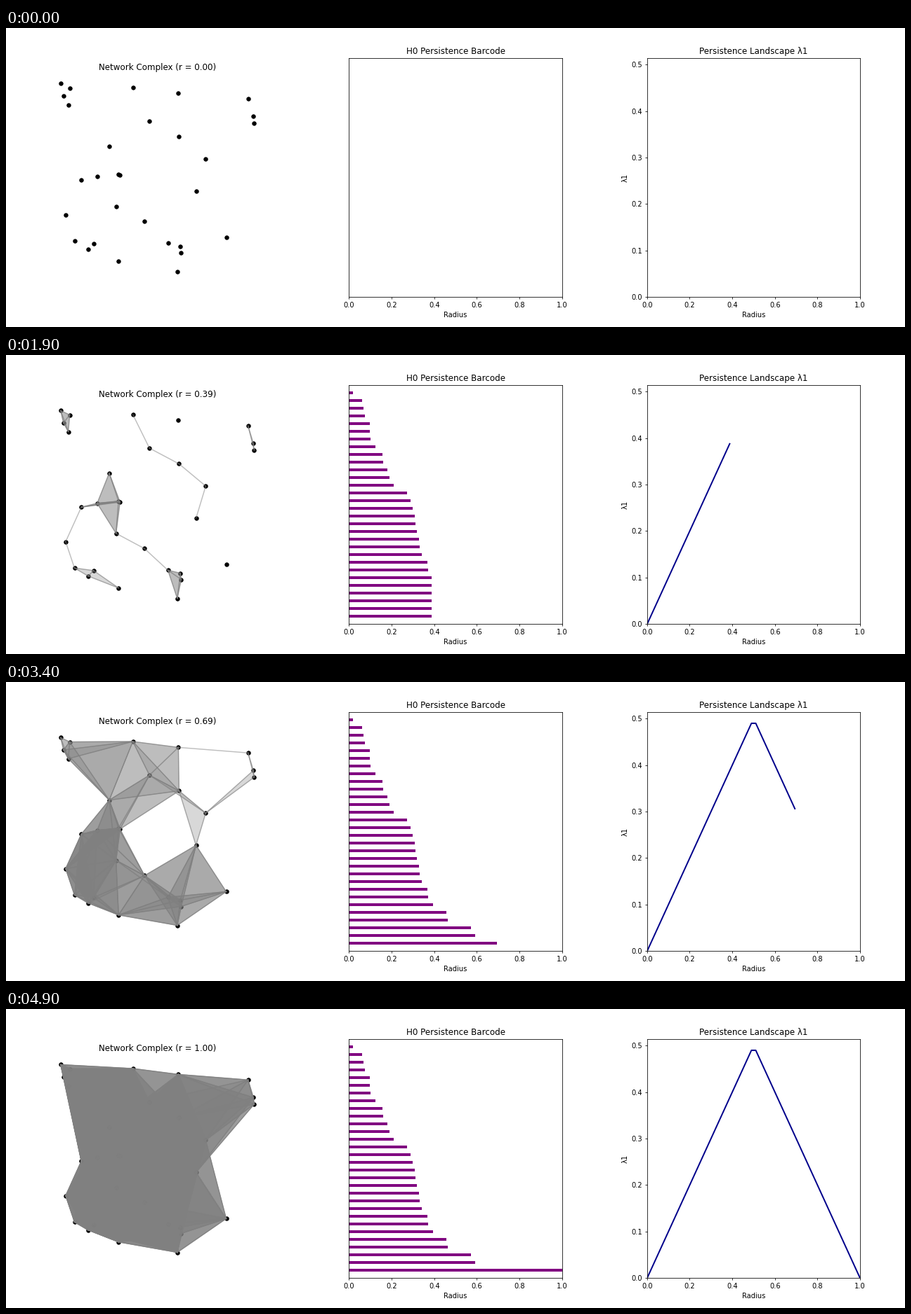
These frames come from a looping animation (1280x427 px, 5 s). A matplotlib script:

```python
from itertools import combinations

import matplotlib.pyplot as plt
import numpy as np
from matplotlib.animation import FuncAnimation
from matplotlib.collections import LineCollection, PolyCollection

WIDTH, HEIGHT = 1280, 427
DPI = WIDTH / 18
FRAMES, INTERVAL = 50, 100
COUNT = 30

np.random.seed(42)
points = 2 * np.random.rand(COUNT, 2) - 1
dist = np.linalg.norm(points[:, None] - points[None], axis=2)
radii = np.linspace(0, 1, FRAMES)

edges = sorted(combinations(range(COUNT), 2), key=lambda e: dist[e])
edge_size = np.array([dist[e] for e in edges])
edge_lines = points[np.array(edges)]

# A triangle appears once its longest side fits the radius.
triangles = np.array(list(combinations(range(COUNT), 3)))
a, b, c = triangles.T
tri_size = np.maximum.reduce([dist[a, b], dist[b, c], dist[a, c]])
tri_shapes = points[triangles]


def merge_radii():
    """Radii at which connected components merge; the last one survives."""
    group = list(range(COUNT))
    deaths = []
    for i, j in edges:
        if group[i] != group[j]:
            old, new = group[j], group[i]
            group = [new if g == old else g for g in group]
            deaths.append(dist[i, j])
    return np.array(deaths + [1.0])


deaths = merge_radii()
bar_y = np.arange(COUNT)[::-1]
landscape = np.minimum(radii, 1 - radii)

# The small margin keeps the pixel size from rounding down.
fig, (net_ax, bar_ax, land_ax) = plt.subplots(
    1, 3, figsize=((WIDTH + 0.01) / DPI, (HEIGHT + 0.01) / DPI), dpi=DPI)
fig.subplots_adjust(left=0.05, right=0.95, bottom=0.1, top=0.9, wspace=0.4)

net_ax.scatter(*points.T, s=30, color="black", zorder=1)
net_ax.set_aspect("equal")
net_ax.axis("off")
title = net_ax.set_title("")
fills = PolyCollection([], facecolor="gray", edgecolor="gray", alpha=0.3,
                       linewidth=1, zorder=1.5)
links = LineCollection([], color="gray", alpha=0.5, linewidth=1.5,
                       capstyle="projecting", zorder=2)
for artist in (fills, links):
    net_ax.add_collection(artist, autolim=False)

bar_ax.set(title="H0 Persistence Barcode", xlabel="Radius",
           xlim=(0, 1), ylim=(-1, COUNT), yticks=[])
bars = LineCollection([], color="purple", linewidth=4, zorder=2)
bar_ax.add_collection(bars, autolim=False)

land_ax.set(title="Persistence Landscape λ1", xlabel="Radius", ylabel="λ1",
            xlim=(0, 1), ylim=(0, 1.05 * landscape.max()))
curve, = land_ax.plot([], [], color="darkblue", linewidth=2)


def update(frame):
    r = radii[frame]
    title.set_text(f"Network Complex (r = {r:.2f})")
    fills.set_verts(tri_shapes[tri_size <= r])
    links.set_segments(edge_lines[edge_size <= r])
    ends = np.minimum(deaths, r)
    bars.set_segments([[(0, y), (x, y)] for x, y in zip(ends, bar_y) if x > 0])
    curve.set_data(radii[:frame + 1], landscape[:frame + 1])
    return title, fills, links, bars, curve


anim = FuncAnimation(fig, update, frames=FRAMES, interval=INTERVAL,
                     repeat=True, repeat_delay=0)
plt.show()
```
